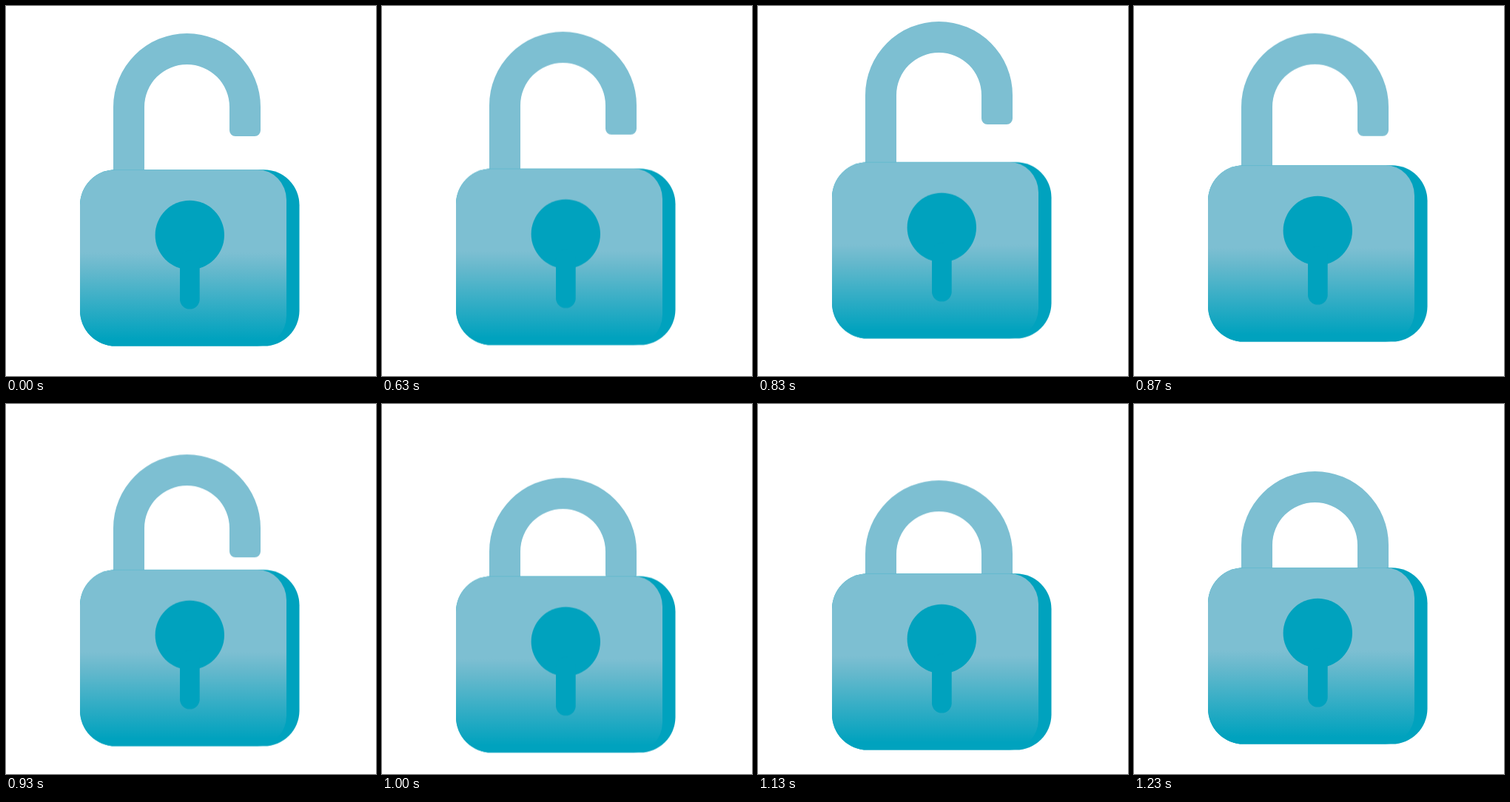
These frames come from a looping animation (500x500 px, 2 s). An HTML page:

```html
<!DOCTYPE html>
<html lang="en">
<head>
<meta charset="utf-8">
<title>Padlock</title>
<style>
  html, body { margin: 0; width: 100%; height: 100%; overflow: hidden; background: #fff; }
  svg { display: block; width: 100vw; height: 100vh; }
  .dark { fill: #00a2be; }
  .light { fill: #7dbfd2; }
</style>
</head>
<body>
<svg viewBox="0 0 500 500">
  <defs>
    <linearGradient id="face" gradientUnits="userSpaceOnUse" x1="0" y1="221" x2="0" y2="459.5">
      <stop offset="0.47" stop-color="#7dbfd2"/>
      <stop offset="0.56" stop-color="#68b9cd"/>
      <stop offset="0.96" stop-color="#00a2be"/>
    </linearGradient>
  </defs>
  <path id="shackle" class="light" d="M145 240V136.5A99.5 99.5 0 0 1 344 136.5V168a8 8 0 0 1-8 8H310a8 8 0 0 1-8-8V136.5A57.5 57.5 0 0 0 187 136.5V240Z"/>
  <g id="body">
    <rect class="dark" x="100" y="221.2" width="296.5" height="238.4" rx="48"/>
    <path fill="url(#face)" d="M148 221.2H340A39 41 0 0 1 379 262.2V418.6A39 41 0 0 1 340 459.6H148A48 48 0 0 1 100 411.6V269.2A48 48 0 0 1 148 221.2Z"/>
    <circle class="dark" cx="248.3" cy="309.5" r="46.7"/>
    <rect class="dark" x="235" y="330" width="26.7" height="79.6" rx="13.3"/>
  </g>
</svg>
<script>
  const TICKS = 60; // 30 per second, two seconds
  const poses = [
    { tick: 0, body: 0, shackle: 0 },
    { tick: 18, body: 0, shackle: 0 },
    { tick: 25, body: -10.3, shackle: -16 },   // lift
    { tick: 31, body: 15.8, shackle: 78.5 },   // snap shut
    { tick: 37, body: 0, shackle: 54 },        // settle
    { tick: TICKS, body: 0, shackle: 54 }
  ];

  function play(id) {
    const frames = poses.map((pose, i) => {
      const next = poses[i + 1];
      return {
        offset: pose.tick / TICKS,
        transform: `translateY(${pose[id]}px)`,
        easing: next ? `steps(${next.tick - pose.tick}, end)` : 'linear'
      };
    });
    document.getElementById(id).animate(frames, {
      duration: 2000, delay: -3.4, iterations: Infinity
    });
  }

  play('body');
  play('shackle');
</script>
</body>
</html>
```
